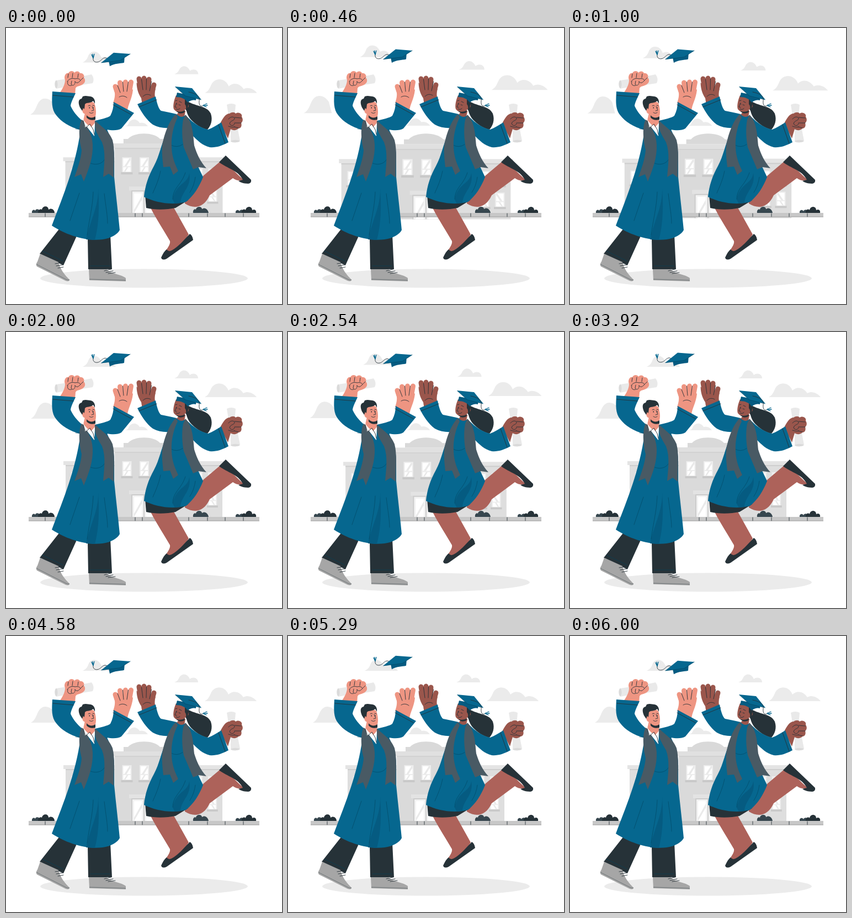
Animation, 500 px wide and 500 px high, one loop 6040 ms. Source, as an HTML page:

```html
<!DOCTYPE html>
<html lang="en">
<head>
<meta charset="utf-8">
<title>Graduates</title>
<style>
  html, body { margin: 0; width: 100%; height: 100%; overflow: hidden; background: #fff; }
  svg { display: block; width: 100vw; height: 100vh; }
  .cloud { fill: #ebebeb; }
  .robe { fill: #06678f; }
  .shade { fill: #055b81; }
  .stole { fill: #495a64; }
  .dark { fill: #263238; }
  .skin { fill: #ee9582; stroke: #ee9582; }
  .brown { fill: #9a564c; stroke: #9a564c; }
  .leg { fill: #ad625a; }
  .paper { fill: #e9e9e9; }
  .roll { fill: #dadada; }
  .shoe { fill: #a6a6a6; }
  .skin, .brown { stroke-width: 0; }
  .fingers { fill: none; stroke-width: 9; stroke-linecap: round; }
  .line { fill: none; stroke: #263238; stroke-width: .9; stroke-linecap: round; stroke-linejoin: round; }
  .fold { fill: none; stroke: #03435f; stroke-width: .6; stroke-linecap: round; }
  .tassel { fill: none; stroke: #06678f; stroke-width: 1.3; stroke-linecap: round; }
</style>
</head>
<body>
<svg viewBox="0 0 500 500">
  <defs>
    <g id="window">
      <path fill="#ededed" d="M0 0H17V27H0Z"/>
      <path fill="#fff" d="M2 2H15V16H2ZM2 18H15V26H2Z"/>
      <path fill="#e9e9e9" d="M4 16L13 2H15V5L8 16ZM3 26L8 18H11L6 26Z"/>
      <path fill="#c9c9c9" d="M-2 27H19V31H-2Z"/>
    </g>
    <g id="wing">
      <path fill="#dedede" d="M108 241H200V335H108Z"/>
      <path fill="#e4e4e4" d="M104 234H198V241H104Z"/>
      <path fill="#cfcfcf" d="M108 241H198V243H108Z"/>
      <use href="#window" transform="translate(118 254) scale(.95 .88)"/>
      <use href="#window" transform="translate(144 254) scale(.95 .88)"/>
      <use href="#window" transform="translate(118 290) scale(.95 .9)"/>
      <use href="#window" transform="translate(144 290) scale(.95 .9)"/>
    </g>
  </defs>

  <g id="scene">
    <g class="cloud">
      <path d="M139 63C145 60 147 57 149 52C153 40 168 40 173 54C180 50 187 54 189 59Q196 58 199 63Z"/>
      <path d="M45 157C52 153 54 147 57 140C61 131 66 128 71 128C78 128 83 132 87 138L92 157Z"/>
      <path d="M305 84Q311 82 313 77C318 66 329 68 333 78C339 73 348 76 348 84Z"/>
      <path d="M360 118C367 114 368 110 371 104C377 89 397 90 403 106C410 99 422 99 430 111C438 106 449 111 454 118Z"/>
      <path d="M216 178C221 177 221 175 223 171C229 163 238 165 242 172Q251 170 257 178Z"/>
    </g>
    <use href="#wing"/>
    <use href="#wing" transform="matrix(-1 0 0 1 500 0)"/>
    <path fill="#d9d9d9" d="M213 209V201H221C232 188 268 188 279 201H287V209Z"/>
    <path fill="#dadada" d="M197 217H303V335H197Z"/>
    <path fill="#e0e0e0" d="M194 209H306V217H194Z"/>
    <path fill="#d2d2d2" d="M197 217H303V219H197Z"/>
    <use href="#window" x="210.500" y="234"/>
    <use href="#window" x="242" y="234"/>
    <path fill="#e3e3e3" d="M223 287H277V294H223Z"/>
    <path fill="#ccc" d="M227 294H273V335H227Z"/>
    <path fill="#f3f3f3" d="M229 296H249V335H229ZM251 296H271V335H251Z"/>
    <path fill="#fff" d="M232 299H246V335H232ZM254 299H268V335H254Z"/>
    <path fill="#eaeaea" d="M232 329L246 304V311L232 335Z"/>
  </g>

  <path fill="#c7c7c7" d="M41 335H459V342.500H41Z"/>
  <path class="line" stroke-width=".7" d="M71 336V342M234 336V342M247 336V342M331 336V342M365 336V342M397 336V342M430 336V342"/>
  <path fill="#959595" d="M41 341.700H459V342.500H41Z"/>
  <g fill="#37474f">
    <path d="M47 335C46 330 51 328 53 331C54 327 60 328 61 331L62 335Z"/>
    <path class="dark" d="M58 335C58 329 63 327 65 329C67 321 77 322 77 329C82 325 88 329 88 335Z"/>
    <path d="M416 335C415 330 421 328 423 332C424 328 431 328 431 335Z"/>
    <path class="dark" d="M427 335C426 329 432 327 434 330C435 322 446 322 446 330C451 327 454 331 453 335Z"/>
    <path d="M339 335C338 330 342 327 344 329C345 322 355 323 355 328C360 324 366 328 367 335Z"/>
  </g>
  <ellipse class="cloud" cx="250" cy="453.500" rx="188" ry="17"/>

  <!-- man -->
  <path class="dark" d="M98 362L128 377L104 430L61 409ZM148 380L189 374L192 437H149Z"/>
  <path class="fold" d="M66 404L103 422M153 431H188"/>
  <path class="shoe" d="M62 409L95 424C98 437 107 448 115 456Q115 460 108 458L56 432Q53 429 57 423Z"/>
  <path class="shoe" d="M150 437H182C190 446 209 446 217 453V459L151 457Z"/>
  <path d="M55 428L110 456Q114 457 115 456M151 455L217 457" fill="none" stroke="#6f7679"/>
  <path class="line" stroke-width="1.300" d="M89 427L101 425M91 431L103 429M94 435L104 433M178 440L190 437M181 443L194 440M185 445L198 443"/>

  <path class="paper" d="M90 95L118 91L122 104L91 110Q86 102 90 95ZM136 88L155 84Q161 92 157 100L138 103Z"/>
  <ellipse class="roll" cx="91" cy="102" rx="2.500" ry="7"/>
  <path class="skin" d="M97 118C104 108 107 101 107 94C104 87 109 80 113 82C115 77 122 77 124 81C127 77 133 78 134 82C139 81 143 86 141 90C145 94 143 100 139 102C134 106 129 104 126 109L125 121Z"/>
  <path class="line" d="M121 82L120 90M131 83L130 90M140 90L136 94M113 83L112 90M111 97C113 93 119 90 125 92C130 91 134 92 135 95M112 97C110 102 114 106 119 104M119 96L118 102C121 106 126 103 125 97M125 97C129 102 132 98 135 95"/>

  <g class="skin">
    <path class="fingers" d="M198 106L204 124M206.500 99L209 121M216.500 98L216 121M226.500 98L222 123"/>
    <path d="M195 110C199 119 197 127 194 136L220 150C221 138 228 130 230 112L224 107L213 108L204 110Z"/>
  </g>
  <path class="line" d="M202 104L207 117M211.500 98L213 115M221.500 98L219 115M205 125C210 122 215 123 219 126" stroke-width=".6"/>

  <path class="skin" d="M143 154L161 157L162 180L155 192L139 172Z"/>
  <path fill="#fff" d="M139 166L153 181L161 172L163 196H140Z"/>
  <path class="robe" d="M84 115L126 118C122 127 118 134 117 141C122 152 129 160 137 167L160 196L161 168C172 165 184 163 189 159C193 151 195 143 195 134L232 154L209 182C203 186 192 186 183 184C190 198 196 215 196 232V270C199 302 203 334 206 366C202 374 190 381 175 383C145 387 109 375 83 358C105 300 126 250 135 185C115 179 100 170 91 158C82 147 83 133 84 115Z"/>
  <path class="shade" d="M167 291C168 322 154 345 145 383L161 384C169 355 169 320 167 291Z"/>
  <path class="fold" d="M158 297C157 325 151 345 147 375M133 299L116 349M178 300C181 325 184 340 184 354M147 242C160 250 174 248 180 236M163 184C170 186 177 186 184 184M126 183Q134 184 140 178"/>
  <path class="line" d="M85 122L122 125M194 139L227 157" stroke-width=".8"/>
  <path class="stole" d="M137 166C131 177 132 202 137 221C136 237 130 253 124 270L136 265L141 278C150 255 158 235 157 211C156 191 147 179 140 168ZM161 170C160 185 166 193 174 207C181 225 178 247 176 270L186 264L195 271C195 247 198 222 193 203C186 185 172 179 162 168Z"/>
  <path fill="#fff" d="M140 165L143 181L151 175L157 183L161 171L160 194L146 178Z"/>
  <path class="line" stroke-width=".7" d="M140 168L144 181L152 174L158 184L160 193"/>
  <path class="skin" d="M140 138C147 132 156 132 160 136C163 144 164 154 162 160C157 165 149 162 145 156C139 156 137 150 139 146Z"/>
  <path class="dark" d="M138 150L134 144C131 137 130 129 137 128L139 124C145 122 149 124 153 124C158 125 162 129 161 137L158 132C153 137 147 134 143 138L142 147L140 145ZM146 158C150 163 157 164 162 160L162 166C155 168 149 166 146 162Z"/>
  <path class="line" d="M149 141Q151 139 153 141M157 140L160 141M156 142L159 149L155 150M151 153Q155 156 158 153"/>
  <path class="dark" d="M150.500 143.500h1.500v2h-1.500ZM157.500 143.500h1.300v2h-1.300Z"/>

  <!-- woman -->
  <path class="leg" d="M262 326L302 322L331 374Q320 393 300 407L289 404C294 397 298 391 297 386C288 370 272 346 262 326ZM324 316C330 307 348 280 357 268L389 241C407 250 418 265 432 276Q419 278 411 272L369 303C358 327 340 328 324 318Z"/>
  <path class="dark" d="M333 373Q338 376 339 384L291 418Q283 422 281 416C284 409 287 404 291 401Q294 406 300 403C313 396 321 385 333 373ZM398 231L444 275Q445 281 439 282C429 282 424 279 421 277L429 275C420 257 401 255 386 243Z"/>
  <path class="dark" d="M252 303L254 326C271 330 292 329 307 326L330 312Z"/>

  <g class="brown">
    <path class="fingers" d="M241 92L245 116M250 91L251 116M259 93L257 116M268 103L263 120"/>
    <path d="M236.500 99C237 113 241 121 245 127L247 140L271 130C269 123 269 117 271 110L262 109L255 107L243 105Z"/>
  </g>
  <path class="line" d="M245.500 93L248 112M254.500 92L254 112M263.500 97L260 114M248 124C252 120 257 119 262 122" stroke-width=".6"/>

  <path class="paper" d="M400 139Q408 135 416 139L414 162L404 164ZM407 181L419 179L424 204Q415 210 407 206Z"/>
  <ellipse class="roll" cx="415.500" cy="205" rx="8" ry="2.200"/>
  <path class="brown" d="M388 173C393 163 398 155 405 155C409 152 414 152 416 155C422 151 429 156 427 161C430 165 429 170 426 172C428 178 425 182 421 182C417 186 411 186 407 183L402 200Z"/>
  <path class="line" d="M426 163L414 162M426 172L414 172M421 181L413 179M403 165C407 160 413 160 414 164C414 168 407 167 405 173C407 178 413 178 414 173M403 178C409 180 413 180 414 179"/>

  <path class="dark" d="M325 130C341 143 363 139 371 155C375 167 371 177 365 184C352 181 342 173 336 167C327 158 326 146 325 138Z"/>
  <path class="brown" d="M308 122C304 131 302 142 304 147C307 151 310 152 313 152L307 160C312 166 320 165 323 161L325 151L331 142L328 127Z"/>
  <path class="dark" d="M324 127L331 132L329 148L325 150Q328 142 324 138ZM308 150C313 153 320 152 324 149L323 153C317 156 312 155 308 150Z"/>
  <path class="line" d="M307 132L310 131M314 133L318 135M308 137L310 138M313 139L316 140M309 136L306 143L309 144M308 147Q312 149 315 146"/>
  <circle cx="325" cy="149" r="1.200" fill="#fff"/>
  <path class="robe" d="M238 138L271 124C274 139 277 147 281 150C291 152 301 154 309 156C313 161 319 163 325 158L337 169C347 177 357 182 366 184C374 181 382 176 390 171L403 207C390 214 380 217 369 216C356 213 346 203 338 195C339 215 341 232 347 249L357 270C350 288 340 304 326 315C300 322 271 316 250 306C252 285 258 268 268 250C278 232 281 210 290 193L298 181C286 182 275 180 266 175C254 166 245 152 238 138Z"/>
  <path class="shade" d="M332 263C330 283 307 281 302 311L306 318L316 317C317 297 337 288 332 263Z"/>
  <path class="fold" d="M325 262C317 286 303 288 302 310M280 259C276 278 271 287 266 299M299 212Q309 218 320 211M343 270Q341 286 333 298"/>
  <path class="line" d="M241 143L273 130M385 175L397 209" stroke-width=".8"/>
  <path class="stole" d="M308 156C298 164 287 189 283 213C282 229 284 241 285 252L297 251L303 266L312 259C304 243 300 229 300 214C299 195 304 176 311 162ZM325 157L321 166C318 182 319 200 322 216L339 256L349 252L363 254C352 242 346 229 341 213C339 191 338 170 325 157Z"/>
  <path class="shade" d="M310 117L308 125C317 125 325 128 329 135C335 130 341 130 344 131L345 124Z"/>
  <path class="robe" d="M306 106L337 109L354 130L325 123Z"/>
  <path class="fold" d="M307 107L325 123L353 130"/>
  <path class="line" d="M331 116C346 119 351 124 350 132C349 140 353 144 358 140"/>
  <path class="tassel" d="M357 140L364 137M358 141L365 140M358 141L363 143"/>

  <g id="cap">
    <path class="line" d="M184 56C176 50 173 61 166 62C161 63 157 60 158 55"/>
    <path class="tassel" d="M158 55L155 48.500M158 55L157 47.500M158 55L160 47.500"/>
    <path class="shade" d="M186 60L188 69.500C197 64 206 65 214 63L215 51Z"/>
    <path class="robe" d="M172 63.500L195 45L225.500 47.300L207 59Z"/>
    <path class="fold" d="M173 63L207 59L225 47"/>
  </g>
</svg>
<script>
  const LOOP = 6040, LEAD = 20, FLOAT = 1500;
  const scene = document.getElementById('scene');
  const cap = document.getElementById('cap');
  // Two beats: time in ms, then scale.
  const beat = [[0, 1], [600, 1.1], [1800, 1], [2400, 1], [3000, 1.1], [3600, 1], [LOOP + LEAD, 1]];

  function scaleAt(t) {
    const i = beat.findIndex(([end], n) => n && t <= end);
    const [t0, a] = beat[i - 1], [t1, b] = beat[i];
    return a + (b - a) * (t - t0) / (t1 - t0);
  }

  function draw(now) {
    const t = now % LOOP + LEAD;
    const rise = 10 * (1 - Math.abs(1 - 2 * (t % FLOAT) / FLOAT));
    scene.setAttribute('transform', `translate(250 190.5) scale(${scaleAt(t)}) translate(-250 -190.5)`);
    cap.setAttribute('transform', `translate(0 ${-rise})`);
  }

  const start = performance.now();
  function tick() {
    draw(performance.now() - start);
    requestAnimationFrame(tick);
  }
  tick();
</script>
</body>
</html>
```
